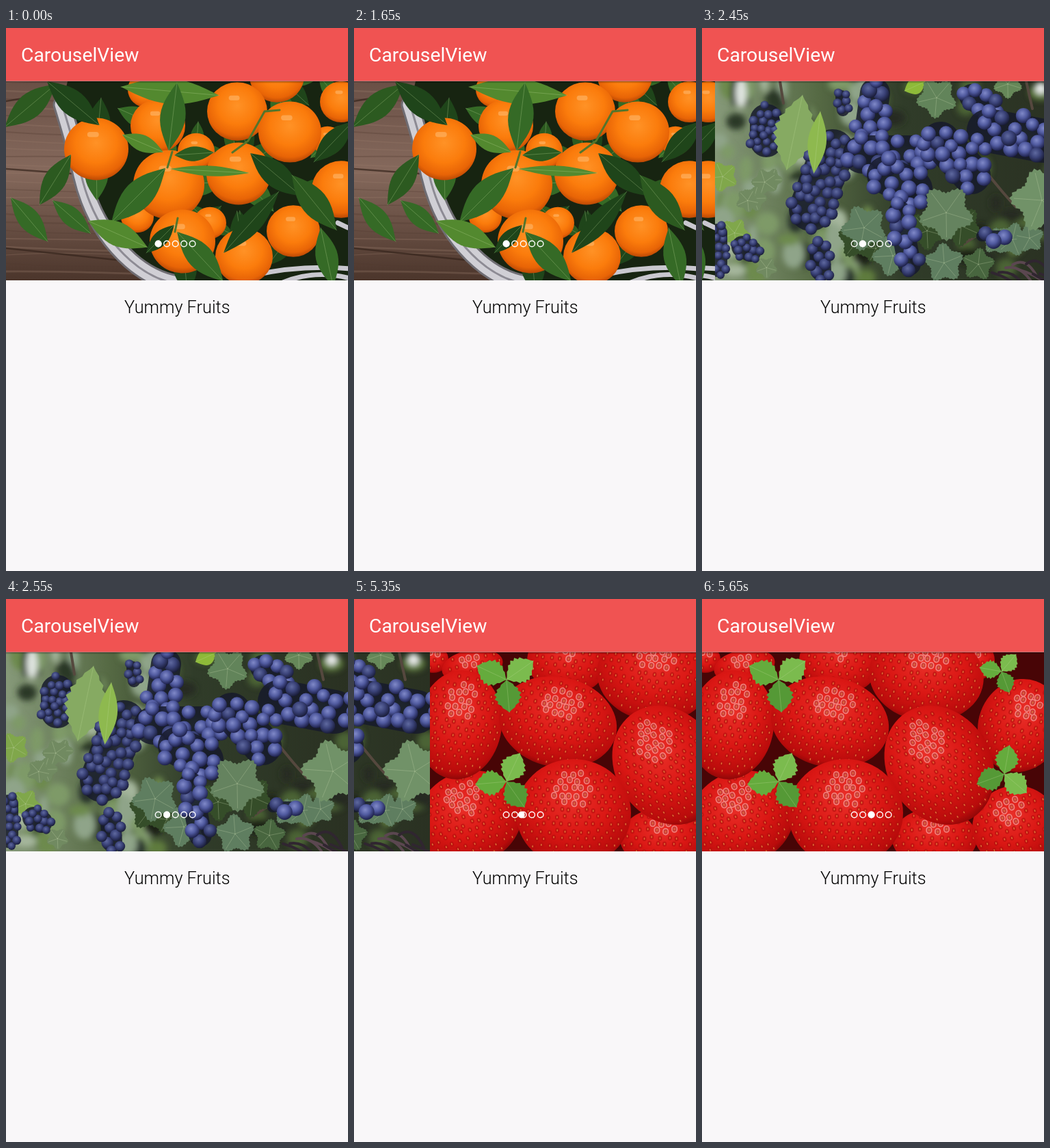
Animation of 500 by 794 pixels, one loop 8 s. Source, as an HTML page:

```html
<!DOCTYPE html>
<html lang="en">
<head>
<meta charset="utf-8">
<title>Carousel</title>
<style>
html, body { margin: 0; width: 100%; height: 100%; overflow: hidden; background: #f9f7f9; }
#stage { display: block; width: 100vw; height: 100vh; }
text { font-family: Roboto, sans-serif; }
</style>
</head>
<body>
<svg id="stage" viewBox="0 0 500 794" preserveAspectRatio="none">
  <defs>
    <radialGradient id="orange" cx=".5" cy=".4" r=".64">
      <stop offset="0" stop-color="#ff9226"/><stop offset=".5" stop-color="#fb7c0c"/>
      <stop offset=".8" stop-color="#e86406"/><stop offset="1" stop-color="#a63c04"/>
    </radialGradient>
    <radialGradient id="grape" cx=".42" cy=".36" r=".65">
      <stop offset="0" stop-color="#8089c8"/><stop offset=".5" stop-color="#505a9f"/>
      <stop offset="1" stop-color="#1c1f48"/>
    </radialGradient>
    <radialGradient id="dim" cx=".42" cy=".36" r=".65">
      <stop offset="0" stop-color="#5f699f"/><stop offset=".5" stop-color="#3a4278"/>
      <stop offset="1" stop-color="#191c38"/>
    </radialGradient>
    <radialGradient id="berry" cx=".48" cy=".36" r=".68">
      <stop offset="0" stop-color="#ea3029"/><stop offset=".5" stop-color="#da1714"/>
      <stop offset=".85" stop-color="#b90b0b"/><stop offset="1" stop-color="#760505"/>
    </radialGradient>
    <linearGradient id="wood" x1="0" y1="0" x2="0" y2="1">
      <stop offset="0" stop-color="#6a5046"/><stop offset=".45" stop-color="#85695c"/>
      <stop offset="1" stop-color="#4b352b"/>
    </linearGradient>
    <linearGradient id="vineyard">
      <stop offset="0" stop-color="#869979"/><stop offset=".3" stop-color="#566a44"/>
      <stop offset=".55" stop-color="#303c29"/><stop offset="1" stop-color="#2a3122"/>
    </linearGradient>
    <linearGradient id="shade" x1="0" y1="0" x2="0" y2="1">
      <stop offset="0" stop-color="#000" stop-opacity=".45"/><stop offset="1" stop-color="#000" stop-opacity="0"/>
    </linearGradient>
    <filter id="soft"><feGaussianBlur stdDeviation="4"/></filter>
  </defs>
  <rect width="500" height="794" fill="#f9f7f9"/>
  <g id="strip"></g>
  <g id="dots" fill="none" stroke="#fff" stroke-width="1.4"></g>
  <circle id="dot" cy="315.5" r="4.9" fill="#fff"/>
  <rect y="77" width="500" height="4" fill="url(#shade)"/>
  <rect width="500" height="77.5" fill="#f05352"/>
  <text x="22" y="49" font-size="28.3" fill="#fff">CarouselView</text>
  <text x="250.3" y="417" font-size="25.3" font-weight="300" text-anchor="middle">Yummy Fruits</text>
</svg>
<script>
const $ = id => document.getElementById(id);
const TAU = Math.PI * 2;
const rad = deg => deg * TAU / 360;

let seed = 7;
const rnd = (a = 0, b = 1) => {
  seed = (seed * 16807) % 2147483647;
  return a + (b - a) * seed / 2147483647;
};
const pick = list => list[Math.floor(rnd(0, list.length))];
const repeat = (n, draw) => Array.from({ length: n }, (_, i) => draw(i)).join('');

const backdrop = fill => `<rect y="78" width="500" height="291" fill="${fill}"/>`;
const shape = (pts, fill) =>
  `<path d="M${pts.map(p => p.map(v => v.toFixed(1)).join(' ')).join('L')}Z" fill="${fill}"/>`;
const oval = (x, y, rx, ry, fill, turn = 0) =>
  `<ellipse rx="${rx}" ry="${ry}" fill="${fill}" transform="translate(${x} ${y}) rotate(${turn})"/>`;
const line = (d, color, width, opacity = 1) =>
  `<path d="${d}" fill="none" stroke="${color}" stroke-width="${width}" stroke-linecap="round" opacity="${opacity}"/>`;

// Pointed leaf growing from (x, y); teeth > 0 gives a serrated edge.
function leaf(x, y, deg, len, fill, ratio = 0.36, teeth = 0) {
  const c = Math.cos(rad(deg)), s = Math.sin(rad(deg)), n = teeth * 2 || 14;
  const side = sign => Array.from({ length: n + 1 }, (_, i) => {
    const u = i / n * len;
    const h = sign * len * ratio / 2 * Math.sin(Math.PI * i / n) * (teeth && i % 2 ? 0.82 : 1);
    return [x + u * c - h * s, y + u * s + h * c];
  });
  return shape([...side(1), ...side(-1).reverse()], fill) +
    line(`M${x} ${y}l${len * c} ${len * s}`, '#bcd896', 0.9, 0.35);
}

function oranges() {
  const greens = ['#2c5a20', '#1f451a', '#356a26'];
  const fruit = [
    [205, 90, 27], [278, 180, 27], [298, 285, 24], [192, 276, 24], [470, 165, 22], [396, 70, 40], [490, 108, 31],
    [222, 143, 40], [338, 122, 44], [415, 152, 46], [490, 236, 43], [340, 213, 47],
    [238, 229, 52], [132, 177, 47], [258, 312, 48], [420, 297, 39], [348, 334, 42]
  ];
  const leaves = [
    [73, 82, 140, 98], [95, 185, 122, 87], [7, 248, 50, 84], [68, 252, 41, 74], [60, 78, 40, 100],
    [168, 86, 5, 144], [250, 80, 97, 100], [154, 284, -45, 112], [246, 186, -4, 58], [357, 183, 40, 98],
    [418, 215, 51, 104], [318, 329, -48, 121], [450, 196, -46, 83], [120, 282, 24, 95], [250, 298, 47, 99],
    [460, 292, 78, 88], [205, 329, -45, 58], [170, 156, 23, 65]
  ];
  const rim = 'M82 112Q100 170 110 215Q128 292 182 340Q214 368 250 374';
  let s = backdrop('url(#wood)');
  s += repeat(24, i => line(`M0 ${80 + i * 12}q90 ${rnd(-8, 8)} 260 ${rnd(0, 10)}`, pick(['#9a7c6c', '#523b31']), rnd(1, 3), 0.3));
  s += line('M0 107L90 92M0 206L110 214M0 322L170 340', '#35241c', 2.5, 0.7);
  s += `<path d="${rim}H500V78H90Z" fill="#172411"/>`;
  s += line(rim, '#6f6d73', 27) + line(rim, '#d0cfd5', 21) + line(rim, '#8d8b94', 3);
  s += line('M360 362Q430 346 502 352M400 374Q450 352 502 366M485 285L500 292', '#c9c8cf', 7);
  for (const [x, y, r] of fruit)
    s += repeat(2, () => leaf(x, y, rnd(0, 360), r * 1.6, pick(greens), 0.45));
  for (const [x, y, r] of fruit)
    s += oval(x, y, r, r * 0.97, 'url(#orange)') + line(`M${x - r * 0.2} ${y - r * 0.45}h${r * 0.2}`, '#ffc887', r * 0.16, 0.45);
  for (const [x, y, deg, len] of leaves)
    s += leaf(x, y, deg, len, deg > 0 && deg < 30 ? '#53892f' : pick(greens), len > 120 ? 0.26 : 0.37);
  return s + leaf(240, 206, 3, 116, '#53892f', 0.13) +
    line('M236 204l7 -23M247 298l4 -20M331 182L354 165L378 122L400 120', '#53752c', 3);
}

// Rounded five-lobed leaf with veins.
function vineLeaf(x, y, r, turn, fill) {
  const at = (a, k) => [x + r * k * Math.cos(a + turn), y + r * k * Math.sin(a + turn)];
  const edge = Array.from({ length: 70 }, (_, i) => {
    const a = i / 70 * TAU;
    return at(a, (0.86 + 0.14 * Math.cos(5 * a)) * (i % 2 ? 0.93 : 1));
  });
  return shape(edge, fill) + line(repeat(5, i => `M${x} ${y}L${at(i * TAU / 5, 0.85)}`), '#c5d6ac', 0.9, 0.35);
}

// Grapes scattered, without crowding, around the line between two points.
function bunch(x1, y1, x2, y2, width, r, fill) {
  const kept = [];
  for (let i = 0; i < 900; i++) {
    const u = rnd(), a = rnd(0, TAU), d = width * Math.sqrt(rnd());
    const p = [x1 + (x2 - x1) * u + d * Math.cos(a), y1 + (y2 - y1) * u + d * Math.sin(a)];
    if (kept.every(q => Math.hypot(p[0] - q[0], p[1] - q[1]) > r * 1.45)) kept.push(p);
  }
  const gap = line(`M${x1} ${y1}L${x2} ${y2}`, '#171a2c', width * 2, 0.85);
  return gap + kept.map(([x, y]) => {
    const size = r * rnd(0.88, 1.05);
    return oval(x, y, size, size, `url(#${rnd() < 0.15 ? 'dim' : fill})`);
  }).join('');
}

function grapes() {
  const pale = ['#a5b69c', '#6d8a4d', '#2b3828', '#7e9a68', '#8fa489', '#26302a'];
  const deep = ['#4c6335', '#1a2016', '#5e7c3c', '#252c20'];
  const vine = ['#5f7e60', '#48663f', '#354d29', '#6d8a62'];
  const far = [[75, 135, 75, 165, 24], [40, 320, 52, 326, 16], [4, 300, 4, 350, 14], [185, 100, 187, 120, 9]];
  const mid = [[172, 180, 140, 265, 32], [153, 325, 155, 355, 15]];
  const near = [
    [234, 95, 226, 150, 22], [215, 185, 295, 185, 28], [375, 100, 400, 120, 18], [400, 150, 480, 165, 32],
    [330, 165, 375, 215, 28], [250, 215, 290, 235, 28], [270, 270, 284, 345, 17], [390, 304, 422, 304, 8]
  ];
  const blur = draw => `<g filter="url(#soft)">${draw}</g>`;
  let s = backdrop('url(#vineyard)');
  s += blur(repeat(80, () => oval(rnd(0, 230), rnd(78, 369), rnd(6, 18), rnd(8, 24), pick(pale))) +
    repeat(40, () => oval(rnd(210, 500), rnd(78, 369), rnd(8, 20), rnd(8, 18), pick(deep))) +
    oval(38, 95, 8, 22, '#dfe5df') + oval(476, 88, 8, 9, '#eceeee'));
  s += line('M455 78L464 118M440 262Q420 240 400 215M400 292L360 318M95 78L100 110', '#55483e', 4);
  s += repeat(8, () => vineLeaf(rnd(0, 130), rnd(200, 360), rnd(16, 26), rnd(0, TAU), pick(['#718a61', '#78906a', '#80a74b'])));
  s += repeat(12, i => vineLeaf(210 + i * 25, rnd(250, 365), rnd(20, 32), rnd(0, TAU), pick(vine)));
  s += repeat(8, i => line(`M${405 + i * 10} ${rnd(345, 360)}q20 ${rnd(-16, 16)} 36 18`, pick(['#5b4750', '#302630']), 4));
  s += far.map(b => bunch(...b, 6.5, 'dim')).join('') + mid.map(b => bunch(...b, 8.5, 'dim')).join('');
  s += leaf(128, 98, 102, 112, '#86aa62', 0.56, 9) + leaf(154, 122, 96, 91, '#8eb94f', 0.3);
  s += vineLeaf(218, 292, 35, 0.5, vine[0]);
  s += near.map(b => bunch(...b, 11, 'grape')).join('');
  return s + leaf(277, 92, -24, 34, '#8eba39', 0.7) + vineLeaf(324, 102, 31, 0.4, '#62845a') +
    vineLeaf(338, 270, 42, 0.3, '#65835f') + vineLeaf(478, 252, 48, 0.7, '#719268') +
    vineLeaf(428, 82, 22, 0.3, '#668859');
}

// One strawberry: body, pale glints, dimples and seeds.
function berry(cx, cy, rx, ry, turn) {
  let glints = '', pits = '', row = 0;
  for (let v = -ry; v < ry; v += 10.5, row++)
    for (let u = -rx + (row % 2) * 6; u < rx; u += 12) {
      const x = u + rnd(-2, 2), y = v + rnd(-2, 2);
      if (Math.hypot(x / rx, y / ry) > 0.95) continue;
      const dot = `M${x.toFixed(1)} ${y.toFixed(1)}v1.5`;
      pits += dot;
      if (Math.hypot(x / rx, y / ry + 0.45) < 0.36) glints += dot;
    }
  return `<g transform="translate(${cx} ${cy}) rotate(${turn})">` + oval(0, 0, rx, ry, 'url(#berry)') +
    line(glints, '#ffc4bc', 9, 0.6) + line(pits, '#b5100e', 6, 0.6) + line(pits, '#dd7a38', 1.5) + '</g>';
}

const sprig = (x, y, turn, len) =>
  repeat(3, i => leaf(x, y, turn + i * 120, len, ['#65ab3d', '#7bbb4e', '#559936'][i], 0.85, 7));

function strawberries() {
  const fruit = [
    [5, 88, 22, 20, 0], [62, 98, 45, 24, -10], [398, 90, 30, 30, 0], [200, 92, 58, 47, 8], [340, 350, 62, 44, 0],
    [328, 112, 84, 67, 8], [465, 185, 61, 69, 20], [458, 333, 63, 60, -15], [58, 320, 78, 68, -20],
    [43, 184, 62, 80, 8], [187, 180, 87, 66, 12], [347, 243, 76, 91, -32], [210, 313, 84, 79, 0]
  ];
  return backdrop('#480506') + fruit.map(f => berry(...f)).join('') +
    sprig(112, 118, -155, 48) + sprig(112, 267, 175, 46) + sprig(438, 106, 190, 33) + sprig(442, 256, -80, 43);
}

$('strip').innerHTML = [oranges, grapes, strawberries].map((draw, i) =>
  `<svg x="${i * 500}" y="78" width="500" height="291" viewBox="0 78 500 291">${draw()}</svg>`).join('');

const GAP = 12.5, FIRST = 222.6;
$('dots').innerHTML = repeat(5, i => `<circle cx="${FIRST + GAP * i}" cy="315.5" r="4.3"/>`);

const LOOP = 8000, TICK = 50, SWIPE = 366;

// Quintic ease-out to the next page; "done" is the share already covered when it first shows.
function swipe(t, show, done) {
  if (t < show) return 0;
  const left = Math.max(0, (1 - done) ** 0.2 - (t - show) / SWIPE);
  return left < 0.26 ? 1 : 1 - left ** 5;
}

function render(now) {
  const t = Math.floor((now % LOOP) / TICK) * TICK;
  const page = swipe(t, 2350, 0.682) + swipe(t, 5350, 0.778);
  $('strip').setAttribute('transform', `translate(${Math.round(-500 * page)} 0)`);
  $('dot').setAttribute('cx', FIRST + GAP * page);
}

const start = performance.now();
function tick() {
  render(performance.now() - start);
  requestAnimationFrame(tick);
}
tick();
</script>
</body>
</html>
```
